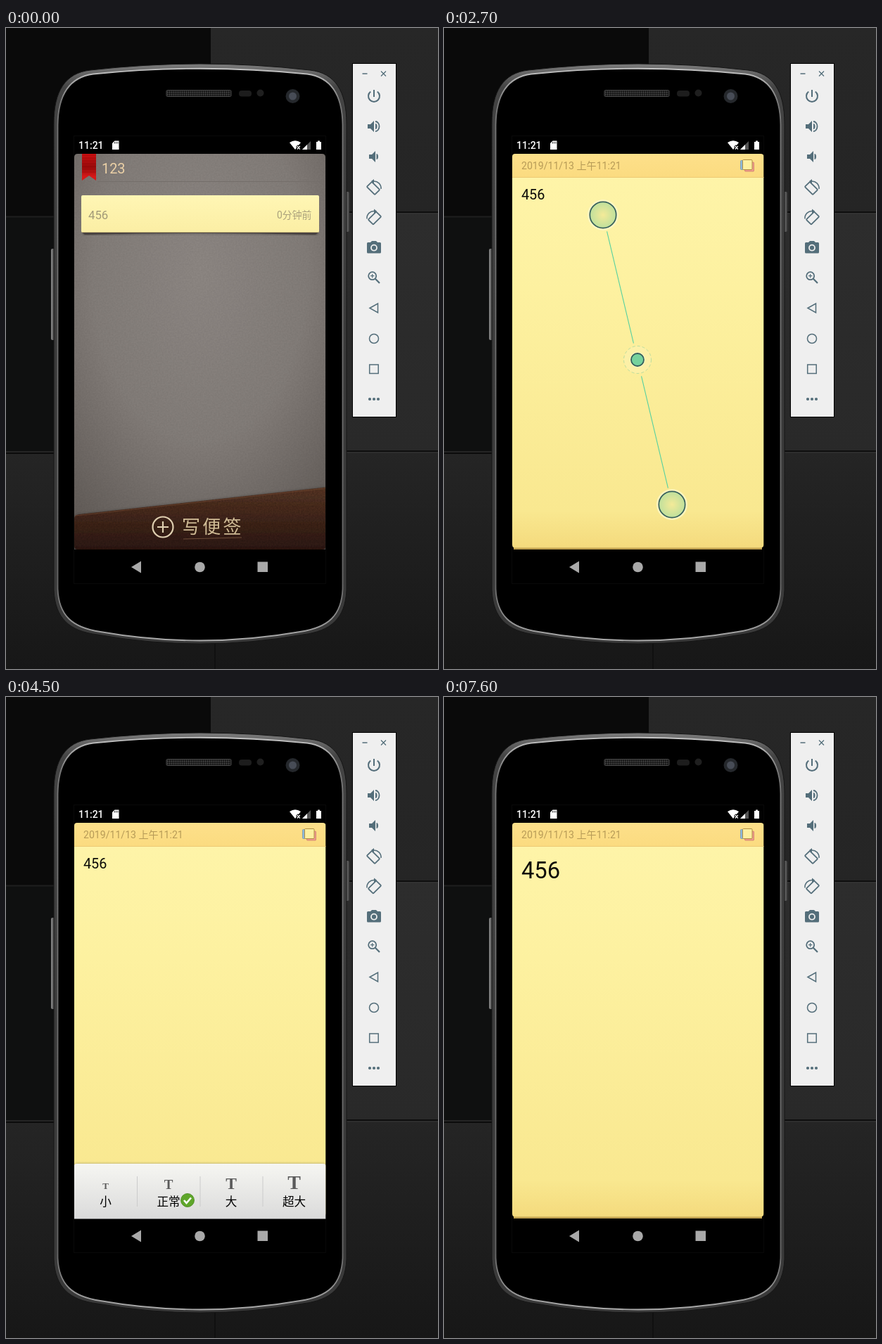
An HTML page for the animation above (8 s loop, 614 px wide and 912 px high).

```html
<!DOCTYPE html>
<html lang="zh-CN">
<head>
<meta charset="utf-8">
<title>Notes demo</title>
<style>
html, body { margin: 0; width: 100%; height: 100%; overflow: hidden; background: #181818; }
svg { display: block; width: 100%; height: 100%; }
text { font-family: Roboto, "Noto Sans CJK SC", "Noto Sans CJK", sans-serif; }
.serif { font-family: "Liberation Serif", "Noto Serif", serif; font-weight: bold; fill: #5a5a5a; }
.mid { text-anchor: middle; }
.icon { fill: none; stroke: #546e7a; stroke-width: 1.8; }
.solid { fill: #546e7a; stroke: none; }
</style>
</head>
<body>
<svg viewBox="0 0 614 912">
<defs>
  <linearGradient id="rim" x2="0" y2="1">
    <stop stop-color="#7c7c7c"/><stop offset=".04" stop-color="#444"/>
    <stop offset=".5" stop-color="#3a3a3a"/><stop offset="1" stop-color="#3a3a3a"/>
  </linearGradient>
  <linearGradient id="edge" x2="0" y2="1">
    <stop stop-color="#c4c4c4"/><stop offset=".06" stop-color="#777"/>
    <stop offset=".9" stop-color="#666"/><stop offset="1" stop-color="#aaa"/>
  </linearGradient>
  <linearGradient id="key"><stop stop-color="#8a8a8a"/><stop offset="1" stop-color="#3c3c3c"/></linearGradient>
  <linearGradient id="upperWall" x2="0" y2="1"><stop stop-color="#272727"/><stop offset="1" stop-color="#252525"/></linearGradient>
  <linearGradient id="rightWall" x2="0" y2="1"><stop stop-color="#2d2d2d"/><stop offset="1" stop-color="#292929"/></linearGradient>
  <linearGradient id="floor" x2="0" y2="1"><stop stop-color="#252525"/><stop offset="1" stop-color="#171717"/></linearGradient>
  <radialGradient id="felt" cx=".5" cy=".3" r=".85">
    <stop stop-color="#8c8682"/><stop offset=".5" stop-color="#827c78"/><stop offset="1" stop-color="#5c5652"/>
  </radialGradient>
  <linearGradient id="leather" x2="0" y2="1"><stop stop-color="#573524"/><stop offset="1" stop-color="#2d1811"/></linearGradient>
  <linearGradient id="ribbon" x2="0" y2="1"><stop stop-color="#cc1012"/><stop offset=".5" stop-color="#990a0a"/><stop offset=".85" stop-color="#d61818"/></linearGradient>
  <linearGradient id="row" x2="0" y2="1"><stop stop-color="#fff6b4"/><stop offset="1" stop-color="#fbeea4"/></linearGradient>
  <linearGradient id="head" x2="0" y2="1"><stop stop-color="#fde08a"/><stop offset="1" stop-color="#fbdb80"/></linearGradient>
  <linearGradient id="paper" x2="0" y2="1">
    <stop stop-color="#fef4a8"/><stop offset=".3" stop-color="#fdf1a0"/>
    <stop offset=".9" stop-color="#f9e890"/><stop offset="1" stop-color="#f4da7d"/>
  </linearGradient>
  <linearGradient id="silver" x2="0" y2="1"><stop stop-color="#f6f6f2"/><stop offset="1" stop-color="#dadada"/></linearGradient>
  <radialGradient id="touch"><stop stop-color="#f4ea98"/><stop offset="1" stop-color="#bfe09c"/></radialGradient>
  <pattern id="mesh" width="3" height="3" patternUnits="userSpaceOnUse"><circle cx="1.5" cy="1.5" r="1" fill="#4c4c4c"/></pattern>
  <filter id="grain" x="0" y="0" width="1" height="1">
    <feTurbulence type="fractalNoise" baseFrequency=".45" numOctaves="2" seed="4"/>
    <feColorMatrix values="0 0 0 0 0  0 0 0 0 0  0 0 0 0 0  .6 0 0 0 -.18"/>
    <feComposite in2="SourceGraphic" operator="in"/>
  </filter>
  <filter id="shade" x="-.1" y="-.1" width="1.2" height="1.2"><feDropShadow dx="0" dy="1" stdDeviation="2" flood-opacity=".55"/></filter>
  <clipPath id="screen"><rect x="97" y="155" width="357.5" height="587.5"/></clipPath>
  <clipPath id="reveal"><rect id="window" x="97" width="357.5"/></clipPath>
</defs>

<!-- wall -->
<rect width="291" height="268" fill="#0a0a0a"/>
<rect x="291" width="323" height="262" fill="url(#upperWall)"/>
<rect y="268" width="400" height="338" fill="#0f1010"/>
<rect x="400" y="262" width="214" height="340" fill="url(#rightWall)"/>
<rect y="602" width="614" height="310" fill="url(#floor)"/>
<path d="M0 268.5H70" stroke="#1e1e1e" stroke-width="2"/>
<path d="M484 262H614M484 602H614" stroke="#0e0e0e" stroke-width="2"/>
<path d="M484 264H614M484 604H614" stroke="#363636"/>
<path d="M0 605H70" stroke="#0b0b0b" stroke-width="2"/>
<path d="M297 870V912" stroke="#101010" stroke-width="2"/>

<!-- phone -->
<rect x="64" y="314" width="6" height="130" rx="2" fill="url(#key)"/>
<rect x="482" y="233" width="6" height="57" rx="2" fill="url(#key)"/>
<path d="M68 136C68 90 84 64 120 60Q276 42 432 60C468 64 484 90 484 136V800C482 840 462 858 422 863Q276 889 130 863C90 858 70 840 68 800Z" fill="url(#rim)" stroke="#161616"/>
<path d="M73.5 138C74 96 90 70 124 65.5Q276 50 428 65.5C462 70 478 96 478.5 138V798C477 836 458 853 418 859Q276 884 134 859C94 853 75 836 73.5 798Z" fill="#000" stroke="url(#edge)" stroke-width="1.8"/>
<rect x="228" y="88.5" width="92" height="9" rx="1.5" fill="#161616" stroke="#484848"/>
<rect x="229" y="89" width="90" height="8" fill="url(#mesh)"/>
<rect x="331" y="89" width="18" height="8.5" rx="4" fill="#1d1d1d"/>
<circle cx="361.5" cy="92.5" r="5" fill="#1f1f1f"/>
<circle cx="407.5" cy="97" r="10" fill="#25282c"/><circle cx="407.5" cy="97" r="5.5" fill="#474c56"/>
<rect x="96.5" y="153.5" width="358" height="637" fill="none" stroke="#090909"/>

<!-- status bar -->
<g fill="#fff">
  <text x="103" y="172.300" font-size="14" font-weight="500">11:21</text>
  <path d="M154.5 160.5H160.5V173H151V164Z"/>
  <path d="M154.5 162v2.5M156.7 162v2.5M158.9 162v2.5" stroke="#000" stroke-width=".8"/>
  <path d="M403 163Q411 157.5 419 163L411 173Z"/>
  <path d="M413.5 167.5l4.5 5m0-5l-4.5 5" stroke="#000" stroke-width="3.5"/>
  <path d="M413.8 168l4 4.5m0-4.5l-4 4.5" stroke="#fff" stroke-width="1.3"/>
  <path d="M421 173L433 161V173Z" fill="#555"/><path d="M421 173L428 166V173Z"/>
  <path d="M441 162H443V160.5H446V162H448V173H441Z"/>
</g>

<g clip-path="url(#screen)">
  <g id="list">
    <path d="M97 742V184Q97 179 102 179H449Q454 179 454 184V742Z" fill="url(#felt)"/>
    <path d="M97 742V184Q97 179 102 179H449Q454 179 454 184V742Z" filter="url(#grain)" opacity=".15"/>
    <path d="M130 218.5H454" stroke="#746e6a"/>
    <path d="M108 179H128V217L118 210L108 217Z" fill="url(#ribbon)"/>
    <path d="M108 181H128M108 185H128M108 189H128M108 193H128M108 197H128M108 201H128M108 205H128" stroke="#7d0000" opacity=".3"/>
    <text x="136" y="207" font-size="19.9" fill="#ebd0a6">123</text>
    <path d="M108 291H444L440 294Q276 290 112 294Z" filter="url(#shade)" fill="#49433f"/>
    <rect x="107" y="238" width="338" height="53" rx="2" fill="url(#row)"/>
    <path d="M108 290.5H444" stroke="#d8c684"/>
    <text x="117" y="271.5" font-size="16.8" fill="#a29a78">456</text>
    <text x="434.5" y="270.8" font-size="13.9" fill="#aaa17c" text-anchor="end">0分钟前</text>
    <path d="M97 698Q97 693 104 692L454 653.5V738Q454 742 449 742H102Q97 742 97 737Z" fill="url(#leather)" filter="url(#shade)"/>
    <path d="M97 698Q97 693 104 692L454 653.5V738Q454 742 449 742H102Q97 742 97 737Z" filter="url(#grain)" opacity=".6"/>
    <path d="M98 694L454 655" stroke="#744b35" opacity=".6"/>
    <g fill="none" stroke="#dfcfb0" stroke-width="2.2">
      <circle cx="223" cy="710" r="14.5"/><path d="M215 710H231M223 702V718"/>
    </g>
    <text x="250" y="718.5" font-size="26" font-weight="300" letter-spacing="3.2" fill="#d0bc96">写便签</text>
    <path d="M252 727L335 725" stroke="#6d4d38"/>
    <rect id="dim" x="97" y="179" width="357" height="40"/>
  </g>

  <g clip-path="url(#reveal)">
    <g id="note">
      <path d="M99 742V700H452V742Z" fill="#bfa04f"/>
      <path d="M97 212H454.5V735Q454 739.5 450 739.5H101Q97 739.5 97 735Z" fill="url(#paper)"/>
      <path d="M97 213V183Q97 179 101 179H450Q454.5 179 454.5 183V213Z" fill="url(#head)"/>
      <path d="M97 212.5H454.5" stroke="#ecc974"/>
      <text x="110" y="201" font-size="14.1" fill="#b79b57">2019/11/13 上午11:21</text>
      <rect x="421.5" y="188.5" width="13" height="13" rx="1" fill="#8fb9d8" stroke="#6d93b0" stroke-width=".7"/>
      <rect x="427.5" y="191" width="13" height="13" rx="1" fill="#ef9c8d" stroke="#c9766a" stroke-width=".7"/>
      <rect x="424.5" y="187.5" width="13.5" height="14" rx="1" fill="#fdf0a0" stroke="#a8863c" stroke-width=".9"/>
      <text id="body" x="110" fill="#0b0b08">456</text>
    </g>
    <rect id="spill" x="97" y="738" width="357.5" height="5" fill="#f4da7d"/>
  </g>

  <g id="tray">
    <path d="M97 743V667Q97 664 101 664H450Q454.5 664 454.5 667V743Z" fill="url(#silver)" filter="url(#shade)"/>
    <path d="M186.5 682V725M276 682V725M365 682V725" stroke="#cbcbcb"/>
    <g id="sizes"></g>
    <g id="check">
      <circle r="9.5" fill="#5fa62a" stroke="#4a8a20" stroke-width=".8"/>
      <path d="M-5 0L-1.5 4L5 -3.5" fill="none" stroke="#fff" stroke-width="2.6"/>
    </g>
  </g>

  <g id="menu">
    <rect x="152" y="549" width="248" height="200" fill="#eee" filter="url(#shade)"/>
    <rect id="press" x="152" y="646" width="248" height="49" fill="#dcdcdc"/>
    <path d="M152 597.5H400M152 646.5H400M152 695.5H400" stroke="#d2d2d2"/>
    <g id="items"></g>
  </g>

  <g id="pinch">
    <g id="fingers"></g>
    <path id="rays" stroke="#55d0a0" stroke-width="1.1"/>
    <circle cx="275" cy="472" r="19.5" fill="#fff" fill-opacity=".12" stroke="#b9dc9f" stroke-dasharray="4 3"/>
    <circle cx="275" cy="472" r="11" fill="#fbf5bd"/>
    <circle cx="275" cy="472" r="9" fill="#76d29d" stroke="#355f5c" stroke-width="1.8"/>
  </g>
</g>

<g fill="#a9a9a9">
  <path d="M178 767L192 758.5V775.5Z"/><circle cx="275.5" cy="767" r="7.3"/>
  <rect x="357.5" y="759.5" width="14.5" height="14.5"/>
</g>

<!-- emulator toolbar -->
<rect x="492.5" y="50.5" width="62" height="503" fill="#efefef" stroke="#000"/>
<g class="icon">
  <path d="M506.5 65H513.5M533 61.5L540 68.5M540 61.5L533 68.5" stroke-width="1.3"/>
  <g transform="translate(523 97)"><path d="M0 -9V1M-4.8 -6.5A8 8 0 1 0 4.8 -6.5" stroke-width="2"/></g>
  <g transform="translate(523 140)">
    <path class="solid" d="M-9 -3H-5L0 -8V8L-5 3H-9Z"/><path class="solid" d="M2 -4A2.5 4 0 0 1 2 4Z"/><path d="M2 -7A5.5 7 0 0 1 2 7"/>
  </g>
  <g transform="translate(523 183)"><path class="solid" d="M-7 -3H-3L2 -8V8L-3 3H-7Z"/><path class="solid" d="M3.5 -4A2.5 4 0 0 1 3.5 4Z"/></g>
  <g id="turn" transform="translate(523 227)">
    <rect x="-5" y="-8" width="10" height="16" rx="1" transform="translate(-1 1) rotate(-45)"/>
    <path d="M-1 -9A10 10 0 0 1 10 2" stroke-width="1.5"/>
    <path class="solid" d="M-4 -9L0 -12V-6Z"/>
  </g>
  <use href="#turn" transform="translate(1046 42.5) scale(-1 1)"/>
  <g transform="translate(523 312)">
    <path class="solid" d="M-10 -5.5Q-10 -7 -8.5 -7H-5L-3 -9H3L5 -7H8.5Q10 -7 10 -5.5V7Q10 8.5 8.5 8.5H-8.5Q-10 8.5 -10 7Z"/>
    <circle r="4" cy=".7" fill="#546e7a" stroke="#efefef" stroke-width="1.8"/>
  </g>
  <g transform="translate(523 355)"><circle cx="-2.3" cy="-2.3" r="5.5"/><path d="M1.8 1.8L8 8" stroke-width="2.2"/><path d="M-5 -2.3H.4M-2.3 -5V.4" stroke-width="1.2"/></g>
  <path d="M517 398.5L528.5 392V405Z" stroke-width="1.5"/>
  <circle cx="523" cy="442" r="6.5" stroke-width="1.5"/>
  <rect x="516.7" y="479" width="12.5" height="12.5" stroke-width="1.5"/>
  <g class="solid"><circle cx="517" cy="528" r="2.1"/><circle cx="523" cy="528" r="2.1"/><circle cx="529" cy="528" r="2.1"/></g>
</g>
</svg>

<script>
const $ = id => document.getElementById(id);
const set = (id, attrs) => { for (const k in attrs) $(id).setAttribute(k, attrs[k]); };
const show = (id, on) => $(id).style.display = on ? '' : 'none';
const columns = [141.5, 231, 320, 409.5];

$('sizes').innerHTML = ['小', '正常', '大', '超大'].map((label, i) =>
  `<text class="serif mid" x="${columns[i]}" y="700" font-size="${[13, 19, 23.5, 28][i]}">T</text>
   <text class="mid" x="${columns[i]}" y="724.3" font-size="16.6">${label}</text>`).join('');
$('items').innerHTML = ['新建便签', '删除', '文字大小', '进入清单模式'].map((label, i) =>
  `<text x="160" y="${579.5 + 48.8 * i}" font-size="17.8" fill="#0c0c0c">${label}</text>`).join('');

function bezier(x1, y1, x2, y2) {
  const curve = (a, b, s) => 3 * (1 - s) ** 2 * s * a + 3 * (1 - s) * s * s * b + s ** 3;
  return x => {
    let lo = 0, hi = 1;
    for (let i = 0; i < 24; i++) {
      const s = (lo + hi) / 2;
      if (curve(x1, x2, s) < x) lo = s; else hi = s;
    }
    return curve(y1, y2, lo);
  };
}
const slideEase = bezier(.4, 0, .2, 1);
const rush = bezier(.3, 0, .8, .15), settle = bezier(.05, .7, .1, 1);
const revealEase = p => p < 1 / 6 ? .4 * rush(p * 6) : .4 + .6 * settle((p - 1 / 6) * 1.2);

// [start, font size, baseline] of the note text
const textSteps = [[0, 19.8, 244.3], [5200, 25.8, 250.2], [7600, 32.7, 257.7]];
// [start, opacity, item pressed]
const menuSteps = [[0, 0], [2900, .5], [3000, 1], [4200, 1, 1], [4400, .4, 1], [4500, 0],
  [6200, .5], [6300, 1], [7100, 1, 1], [7200, .4, 1], [7300, 0]];
// [start, end, pointer x, pointer y]
const pinches = [[2700, 2900, 226, 266], [6100, 6200, 324, 708]];
const trays = [[4400, 5200], [7200, 7600]];

const current = (steps, t) => steps.filter(s => s[0] <= t).pop();
const active = (spans, t) => spans.find(s => s[0] <= t && t < s[1]);

function drawOpening(t) {
  const p = Math.min(1, Math.max(0, (t - 1520) / 425));
  const slide = slideEase(p), shift = 24 * (1 - slide);
  const top = 155 + shift + 510 * (1 - revealEase(p));
  show('list', p < 1);
  show('note', p > 0);
  show('spill', p > 0 && p < .85);
  set('list', { transform: `translate(0 ${-12.4 * slide})` });
  set('dim', { opacity: .15 * slide });
  set('note', { transform: `translate(0 ${shift})` });
  set('window', { y: top, height: 743 - top });
}

function drawPinch(span) {
  show('pinch', span);
  if (!span) return;
  const cx = 275, cy = 472, dx = span[2] - cx, dy = span[3] - cy, len = Math.hypot(dx, dy);
  const at = d => `${cx + dx * d / len} ${cy + dy * d / len}`;
  $('fingers').innerHTML = [-1, 1].map(k => `<g transform="translate(${cx + k * dx} ${cy + k * dy})">
    <circle r="22" fill="#fff8c8" opacity=".8"/>
    <circle r="18.7" fill="url(#touch)" stroke="#355f5c" stroke-width="1.7"/></g>`).join('');
  set('rays', { d: `M${at(24)}L${at(len - 24)}M${at(-24)}L${at(24 - len)}` });
}

function render(t) {
  drawOpening(t);
  const [, size, baseline] = current(textSteps, t);
  set('body', { 'font-size': size, y: baseline });
  const [, opacity, pressed] = current(menuSteps, t);
  show('menu', opacity);
  set('menu', { opacity });
  show('press', pressed);
  show('tray', active(trays, t));
  set('check', { transform: `translate(${t < 5200 ? 258 : 347.5} 716)` });
  drawPinch(active(pinches, t));
}

// The picture advances in 100 ms ticks.
const begin = performance.now();
function tick(now) {
  const t = Math.max(0, now - begin) % 8000;
  render(Math.floor(t / 100) * 100);
  requestAnimationFrame(tick);
}
render(0);
requestAnimationFrame(tick);
</script>
</body>
</html>
```
